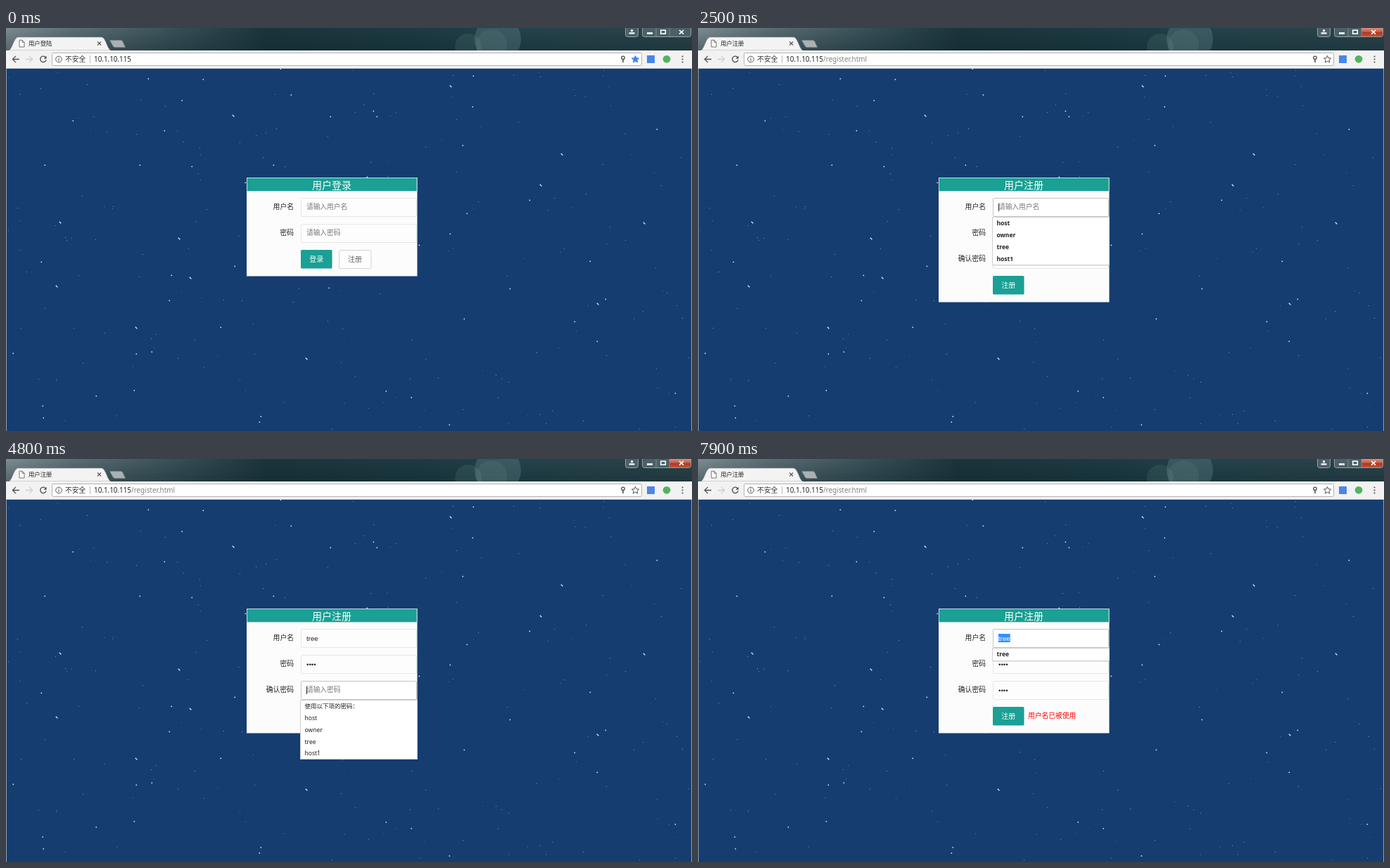
These frames come from a looping animation (975x574 px, 8 s). An HTML page:

```html
<!DOCTYPE html>
<html lang="zh-CN">
<head>
<meta charset="utf-8">
<title>用户注册</title>
<style>
  html, body { margin: 0; width: 100%; height: 100%; overflow: hidden; background: #153d70; }
  svg { display: block; width: 100%; height: 100%; }
  text { font-family: "Noto Sans", "Noto Sans CJK SC", "Noto Sans CJK", sans-serif; white-space: pre; }
  .cjk { font-family: "Noto Sans CJK SC", "Noto Sans CJK", sans-serif; }
  .arial { font-family: "Liberation Sans", "Noto Sans CJK SC", "Noto Sans CJK", sans-serif; }
</style>
</head>
<body>
<svg viewBox="0 0 975 574" preserveAspectRatio="none">
  <defs>
    <linearGradient id="glass">
      <stop offset="0" stop-color="#7d8c91"/>
      <stop offset=".1" stop-color="#5b6e74"/>
      <stop offset=".25" stop-color="#364f56"/>
      <stop offset=".38" stop-color="#1b343c"/>
      <stop offset=".6" stop-color="#1d3a42"/>
      <stop offset=".75" stop-color="#24424a"/>
      <stop offset="1" stop-color="#2b434a"/>
    </linearGradient>
    <linearGradient id="shade" x2="0" y2="1">
      <stop offset="0" stop-color="#0b2026" stop-opacity="0"/>
      <stop offset="1" stop-color="#0b2026" stop-opacity=".35"/>
    </linearGradient>
    <linearGradient id="red" x2="0" y2="1">
      <stop offset="0" stop-color="#d8917f"/>
      <stop offset=".45" stop-color="#c25b47"/>
      <stop offset=".5" stop-color="#ad3420"/>
      <stop offset="1" stop-color="#c4573a"/>
    </linearGradient>
  </defs>
  <g id="back"></g>
  <g id="live"></g>
</svg>
<script>
const LOOP = 8000, TEAL = '#1aa094', INK = '#222', HINT = '#777';
const NAMES = ['host', 'owner', 'tree', 'host1'];
const TYPED = 'tree', CARET_X = [0, 2.7, 5.9, 11.3, 16.7];

const rect = (x, y, w, h, fill, extra = '') =>
  `<rect x="${x}" y="${y}" width="${w}" height="${h}" fill="${fill}" ${extra}/>`;
const path = (d, stroke, width = 1, fill = 'none') =>
  `<path d="${d}" stroke="${stroke}" stroke-width="${width}" fill="${fill}"/>`;
const dot = (x, y, r, fill, extra = '') =>
  `<circle cx="${x}" cy="${y}" r="${r}" fill="${fill}" ${extra}/>`;
const text = (x, y, size, fill, str, extra = '') =>
  `<text x="${x}" y="${y}" font-size="${size}" fill="${fill}" ${extra}>${str}</text>`;
const box = (x, y, w, h, line, fill = '#fff', r = 0) =>
  rect(x + .5, y + .5, w - 1, h - 1, fill, `rx="${r}" stroke="${line}"`);
const CJK = 'class="cjk"', ARIAL = 'class="arial"';

// x, y pairs
const BRIGHT = [202,72, 280,73, 250,103, 405,95, 390,58, 461,126, 527,126, 522,118, 664,68, 663,112,
  95,132, 225,146, 649,167, 55,195, 190,195, 264,197, 380,195, 513,212, 50,333, 235,352, 325,339,
  232,388, 305,426, 185,464, 207,461, 10,463, 540,517, 576,526, 630,565, 362,553, 360,561, 182,516,
  128,524, 52,538, 53,555, 651,414, 716,371, 808,418, 852,386, 744,245, 655,264, 631,293, 830,332,
  925,144, 951,520, 840,446, 587,309, 459,370, 340,220];
const STREAKS = [323,125, 632,83, 790,180, 760,224, 77,277, 246,300, 72,368, 262,356, 185,427,
  427,471, 841,393, 907,278];

function stars() {
  let seed = 11, out = '';
  const rnd = () => (seed = seed * 16807 % 2147483647) / 2147483647;
  for (let i = 0; i < 190; i++) {
    const x = 3 + Math.floor(rnd() * 968), y = 60 + Math.floor(rnd() * 512);
    out += rect(x, y, 1, 1, '#a9c0dc', `opacity="${(.35 + rnd() * .45).toFixed(2)}"`);
  }
  for (let i = 0; i < BRIGHT.length; i += 2)
    out += dot(BRIGHT[i] + .3, BRIGHT[i + 1] + .3, .9, '#e6eef8');
  for (let i = 0; i < STREAKS.length; i += 2)
    out += path(`M${STREAKS[i] - 1.2} ${STREAKS[i + 1] - 1.2}l2.6 2.6`, '#e6eef8', 1.3);
  return out;
}

function backdrop() {
  return rect(0, 0, 975, 574, '#153d70') + stars() +
    rect(0, 0, 975, 32, 'url(#glass)') + rect(0, 0, 975, 32, 'url(#shade)') +
    dot(699, 16, 33, '#8fb0b4', 'opacity=".22"') + dot(657, 27, 19, '#8fb0b4', 'opacity=".12"') +
    dot(690, 24, 22, '#8fb0b4', 'opacity=".1"') +
    path('M4 32C9 30 11 14 17 13H136C142 14 144 30 149 32Z', '#7d898c', .6, '#f3f3f3') +
    path('M147.5 17.5H163q2 0 3 2l3.5 8H155q-2 0-3-2Z', '#75858a', .7, '#a9b1b3') +
    path('M130 19.5l5 5m0-5l-5 5', '#555', 1.1) +
    rect(0, 32, 975, 25, '#f2f2f2') + rect(0, 57, 975, 1, '#c3c9cf') +
    rect(0, 58, 1, 516, '#93a0aa') + rect(974, 58, 1, 516, '#93a0aa') +
    box(65, 35, 839, 19, '#b3b3b3', '#fff', 2) +
    path('M19 44.5H9.5m4.5-4.6l-4.6 4.6 4.6 4.6', '#505050', 1.3) +
    path('M28 44.5h9.5m-4.5-4.6l4.6 4.6-4.6 4.6', '#cfcfcf', 1.3) +
    dot(75, 44.5, 4.3, 'none', 'stroke="#555"') + rect(74.5, 43.8, 1.1, 3.2, '#555') + rect(74.5, 41.8, 1.1, 1.1, '#555') +
    rect(911, 39, 11, 11, '#4a86e8') + dot(939, 44.3, 5.4, '#52b45c') +
    [40.5, 44.5, 48.5].map(y => dot(961.5, y, 1.1, '#555')).join('');
}

function windowButtons(active) {
  const frame = (x, w, fill) =>
    path(`M${x} 0V9.5q0 3 3 3h${w - 6}q3 0 3-3V0`, '#a8b6ba', .8, fill);
  return frame(880.5, 18, '#4b6067') + frame(904.5, 69, '#4b6067') +
    (active ? path('M943 0V12.3h27q3-.3 3-3V0Z', 'none', 0, 'url(#red)') : '') +
    path('M924 0V12.5M943 0V12.5', '#93a3a8', .7) +
    dot(889.5, 3.8, 1.7, '#fff') + rect(885.5, 6.3, 8, 2.2, '#fff') +
    rect(911, 6.2, 8, 2.6, '#fff') + rect(930.7, 3.2, 6.6, 5, 'none', 'stroke="#fff" stroke-width="1.6"') +
    path('M957 3l6 5.6m0-5.6l-6 5.6', '#fff', 1.7);
}

function chrome(t) {
  const loading = t >= 1200 && t < 1700, moved = t >= 1200;
  let out = windowButtons(t >= 900);
  out += loading
    ? `<g transform="rotate(${(Math.floor(t / 100) - 14) * 60} 22.5 22)">` + path('M21.5 17.8A4.2 4.2 0 0 1 26.7 22.5', '#5784bd', 1.3) + '</g>' +
      path('M49 40.5l8 8m0-8l-8 8', '#505050', 1.4)
    : path('M19 17.3h4l3 3V27H19ZM23 17.3v3h3', '#666', .9, '#fff') +
      path('M56.3 41.9A4.2 4.2 0 1 0 57 45.3', '#505050', 1.4) + path('M57.6 39.7v4h-4Z', 'none', 0, '#505050');
  out += text(32, 25.3, 8.4, INK, moved ? '用户注册' : '用户登陆', CJK);
  if (!loading)
    out += text(84, 48, 9.8, '#333', '不安全', CJK) + rect(119, 39, 1, 11, '#bbb') +
      dot(877, 42.3, 2.2, 'none', 'stroke="#505050" stroke-width="1.4"') + rect(876.2, 44.5, 1.6, 4.6, '#505050');
  out += text(loading ? 84 : 125, 48, 9.85, INK,
    '10.1.10.115' + (moved ? '<tspan fill="#808080">/register.html</tspan>' : ''));
  const star = 'M894.5 39.4l1.5 3.3 3.6.4-2.7 2.4.8 3.6-3.2-1.9-3.2 1.9.8-3.6-2.7-2.4 3.6-.4Z';
  return out + (moved ? path(star, '#505050', 1) : path(star, '#4285f4', 1, '#4285f4'));
}

function field(y, label, { value = '', hint = '', focus = false, caret = -1, picked = false }) {
  let out = text(409, y + 16.2, 9.8, INK, label, CJK + ' text-anchor="end"') +
    box(419, y, 165, 27, focus ? '#c4c4c4' : '#e6e6e6', focus ? '#fff' : '#fdfdfd', 1);
  if (picked) out += rect(427, y + 7, 16.7, 12, '#3390ff');
  out += value
    ? text(427, y + 16.6, 9.7, picked ? '#fff' : INK, value, ARIAL)
    : text(427, y + 16.3, 9.7, HINT, hint, CJK);
  return out + (caret >= 0 ? rect(427 + caret, y + 8, 1, 11, '#222') : '');
}

const solidButton = (y, label, hover) =>
  rect(419, y, 44.5, 26.5, hover ? '#48b3a9' : TEAL, 'rx="1.5"') +
  text(441.2, y + 17, 10, '#fff', label, CJK + ' text-anchor="middle" font-weight="500"');

const panel = (h, title) =>
  rect(342, 213, 242.5, h, '#fcfcfc') + rect(342.5, 213.5, 241.5, 19, TEAL, 'stroke="#bfe3df" stroke-width=".9"') +
  text(463, 228.8, 14, '#fff', title, CJK + ' text-anchor="middle"');

function list(y, h, rows, extra = '') {
  return rect(419, y + 1, 166, h, '#000', 'opacity=".08"') + box(418, y, 167, h, '#cfcfcf') +
    rows.map((r, i) => text(424.5, y + 12.4 + i * 16.7, 8.5, INK, r, extra)).join('');
}

function loginPage(t) {
  return panel(140.5, '用户登录') +
    field(242, '用户名', { hint: '请输入用户名' }) + field(279, '密码', { hint: '请输入密码' }) +
    solidButton(316, '登录') + box(473, 316, 46.5, 27, t >= 1000 ? '#4db3aa' : '#d4d4d4', '#fdfdfd', 1.5) +
    text(496, 333.2, 10, '#666', '注册', CJK + ' text-anchor="middle"');
}

// how many of the given moments have passed
const count = (t, ...at) => at.filter(a => t >= a).length;
const within = (t, a, b) => t >= a && t < b;

function registerPage(t) {
  const chars = count(t, 2700, 3000, 3100, 3300);
  const first = count(t, 4000, 4000, 4100, 4200), second = count(t, 4900, 4900, 5100, 5300);
  const nameFocus = within(t, 1900, 3500), passFocus = within(t, 3700, 4700), againFocus = within(t, 4700, 6500);
  const picked = t >= 7600;
  const blink = !within(t, 5700, 6200);
  let out = panel(177.5, '用户注册') +
    field(242, '用户名', { value: TYPED.slice(0, chars), hint: '请输入用户名', focus: nameFocus || picked,
      caret: nameFocus ? CARET_X[chars] : -1, picked }) +
    field(279, '密码', { value: '•'.repeat(first), hint: '请输入密码', focus: passFocus,
      caret: passFocus ? first * 3.4 : -1 }) +
    field(316, '确认密码', { value: '•'.repeat(second), hint: '请输入密码', focus: againFocus,
      caret: againFocus && blink ? second * 3.4 : -1 }) +
    solidButton(353, '注册', within(t, 5900, 6800));
  if (t >= 6700) out += text(469, 369.3, 9.75, '#f00', '用户名已被使用', CJK);
  const bold = 'font-weight="700"';
  if (within(t, 2400, 2700)) out += list(269, 69, NAMES, bold);
  if (within(t, 2700, 3300) || t >= 7900) out += list(269, 19, [TYPED], bold);
  if (within(t, 4700, 4900)) out += list(343, 85, ['使用以下项的密码：', ...NAMES]);
  return out;
}

const live = document.getElementById('live');
document.getElementById('back').innerHTML = backdrop();
let shown = '';
function draw(t) {
  const scene = chrome(t) + (t < 1600 ? loginPage(t) : registerPage(t));
  if (scene !== shown) live.innerHTML = shown = scene;
}

const start = performance.now();
function tick() {
  draw((performance.now() - start) % LOOP);
  requestAnimationFrame(tick);
}
tick();
</script>
</body>
</html>
```
